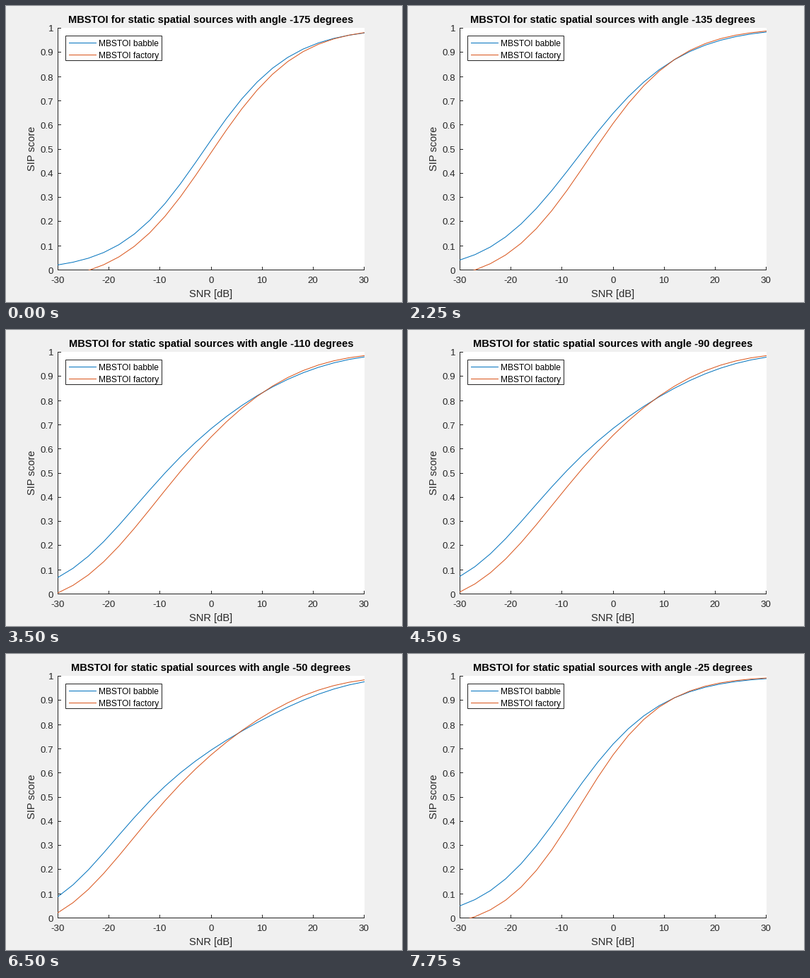
Recreate the animation shown at these times as a matplotlib script. Size 560 px wide and 420 px high, loop 8000 ms.

```python
import math

import numpy as np
import matplotlib.pyplot as plt
from matplotlib.animation import FuncAnimation
from matplotlib.patches import Rectangle

plt.rcParams["font.family"] = "Liberation Sans"
plt.rcParams["toolbar"] = "None"

WIDTH, HEIGHT, DPI = 560, 420, 80
PT = 72 / DPI  # points per pixel
LEFT, RIGHT, TOP, BOTTOM = 73, 507, 31, 375
GREY, BLUE, ORANGE = "#262626", "#0072BD", "#D95319"
SNR = np.arange(-30, 31, 3)

# Level and slope of each curve's logit at 0 dB, for a few source angles
ANGLES = [-175, -155, -135, -110, -70, -50, -25]
BABBLE = dict(level=[.15, .63, .61, .77, .78, .82, .94],
              slope=[3.68, 3.82, 3.20, 2.45, 2.20, 2.00, 3.45],
              steepness=4.1, bend=-.12, floor=0)
FACTORY = dict(level=[.04, .47, .51, .69, .75, .80, .80],
               slope=[3.60, 3.90, 3.56, 2.82, 2.65, 2.45, 3.90],
               steepness=4.4, bend=0, floor=.05)


def x_px(snr):
    return LEFT + (snr + 30) / 60 * (RIGHT - LEFT)


def y_px(score):
    return BOTTOM - 0.5 - score * (BOTTOM - TOP - 1)


def pixel_center(value):
    return math.floor(value) + 0.5


def curve(angle, level, slope, steepness, bend, floor):
    """Sigmoid whose tails get steeper as its middle gets flatter."""
    z = SNR / 30
    a, b = np.interp(angle, ANGLES, level), np.interp(angle, ANGLES, slope)
    logit = a + b * z + bend * z**2 + (steepness - b) / 2 * z**3
    return y_px((1 + floor) / (1 + np.exp(-logit)) - floor)


fig = plt.figure(figsize=(WIDTH / DPI, HEIGHT / DPI), dpi=DPI, facecolor="#F0F0F0")
ax = fig.add_axes([0, 0, 1, 1])
ax.set_xlim(0, WIDTH)
ax.set_ylim(HEIGHT, 0)
ax.axis("off")


def label(x, y, text, size, color=GREY, ha="center", **style):
    return ax.text(x, y, text, fontsize=size * PT, color=color, ha=ha,
                   va="baseline", **style)


def stroke(xs, ys, color=GREY, **style):
    return ax.plot(xs, ys, color=color, lw=PT, snap=False,
                   solid_capstyle="butt", **style)[0]


plot_area = Rectangle((LEFT, TOP), RIGHT - LEFT, BOTTOM - TOP, fc="white", lw=0, zorder=0)
ax.add_patch(plot_area)

stroke([LEFT + 0.5] * 2, [TOP, BOTTOM])
stroke([LEFT, RIGHT], [BOTTOM - 0.5] * 2)
for i in range(11):
    y = pixel_center(y_px(i / 10))
    stroke([LEFT, 78], [y, y])
    label(67.2, y + 5, f"{i / 10:g}", 13.33, ha="right")
for snr in range(-30, 31, 10):
    x = min(pixel_center(x_px(snr)), RIGHT - 0.5)
    stroke([x, x], [370, BOTTOM])
    label(x - 0.5, 393, str(snr), 13.33)

label(290, 413, "SNR [dB]", 14.67)
label(41, 202, "SIP score", 14.67, rotation=90, rotation_mode="anchor")
title = label(290, 24, "", 14.67, color="black", weight="bold")

babble_line = stroke([], [], BLUE, zorder=3)
factory_line = stroke([], [], ORANGE, zorder=3)
for line in (babble_line, factory_line):
    line.set_clip_path(plot_area)

ax.add_patch(Rectangle((84.5, 42.5), 136, 35, fc="white", ec=GREY, lw=PT,
                       snap=False, zorder=4))
for y, name, color in ((52.5, "babble", BLUE), (69.5, "factory", ORANGE)):
    stroke([89, 128], [y, y], color, zorder=5)
    label(131, y + 4.5, f"MBSTOI {name}", 12, color="black", ha="left", zorder=5)


def update(frame):
    angle = -175 + 5 * max(frame - 1, 0)  # the first angle is held twice as long
    title.set_text(f"MBSTOI for static spatial sources with angle {angle} degrees")
    babble_line.set_data(x_px(SNR), curve(angle, **BABBLE))
    factory_line.set_data(x_px(SNR), curve(angle, **FACTORY))
    return title, babble_line, factory_line


animation = FuncAnimation(fig, update, frames=32, interval=250, repeat=True,
                          repeat_delay=0, blit=False)
plt.show()
```
